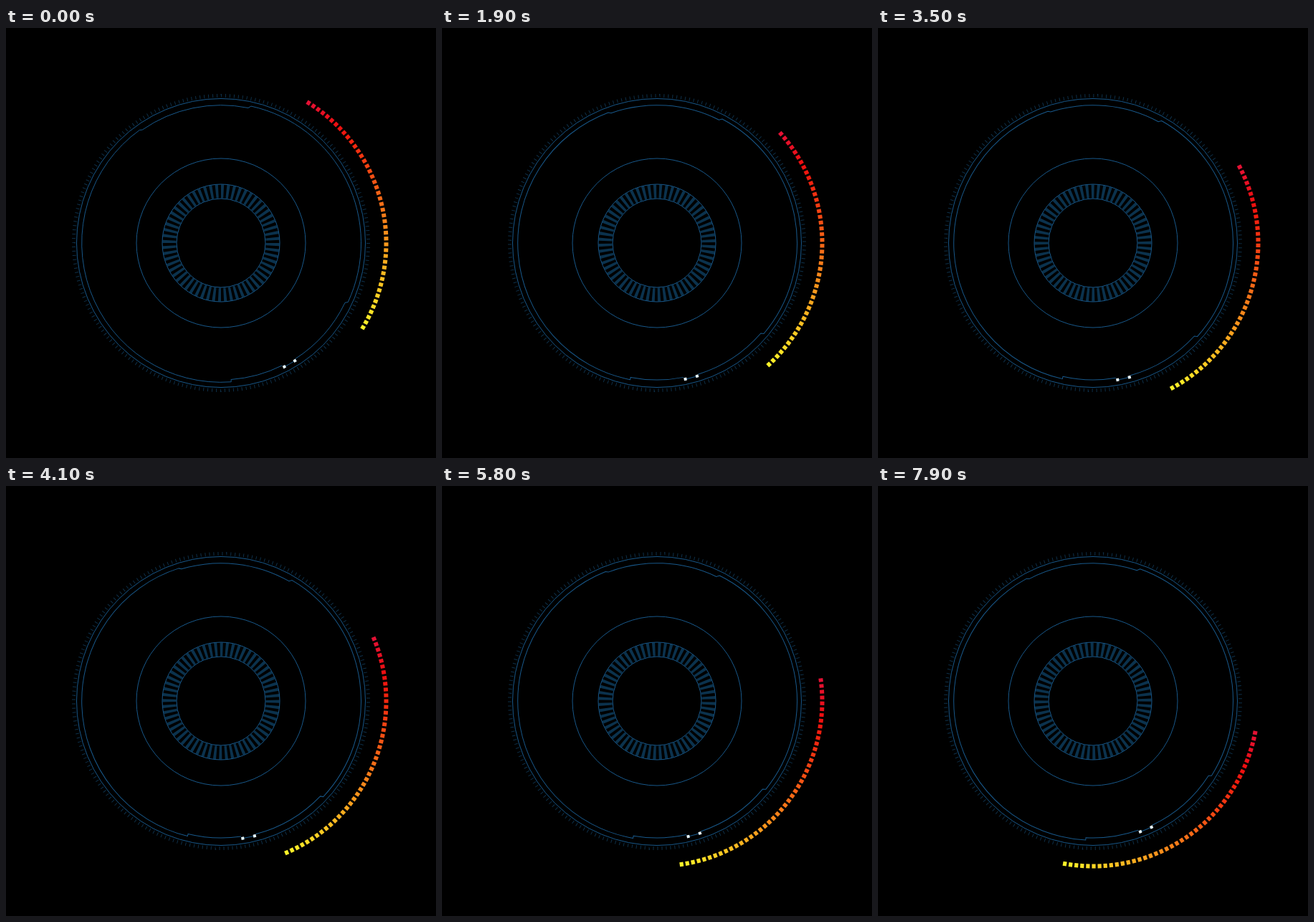
Animation, 600 px wide and 600 px high, one loop 8000 ms. Source, as an HTML page:

```html
<!DOCTYPE html>
<html lang="en">
<head>
<meta charset="utf-8">
<title>Dial</title>
<style>
  html, body { margin: 0; width: 100%; height: 100%; overflow: hidden; background: #000; }
  svg { display: block; width: 100vw; height: 100vh; }
  .line { fill: none; stroke: #18588a; stroke-width: 1; }
  .ticks { fill: none; stroke: #0e3049; stroke-width: 5; stroke-dasharray: 1 5; }
  .spokes { fill: none; stroke: #0b324d; stroke-width: 19; stroke-dasharray: 4 4; }
  .dot { fill: #e6f8ff; }
</style>
</head>
<body>
<svg viewBox="-300 -300 600 600">
  <circle class="ticks" id="ticks" r="205.5" pathLength="1296"/>
  <circle class="line" r="201.5"/>
  <g id="ring"></g>
  <circle class="line" r="118"/>
  <circle class="spokes" id="spokes" r="72" pathLength="480"/>
  <circle class="line" r="82"/>
  <circle class="line" r="62"/>
  <g id="meter"></g>
</svg>
<script>
const LOOP = 8000, STEP = 100;
const COUNT = 45, SPAN = 88.7;
const SWING = 1.55; // seconds per swing of the notched ring
const $ = id => document.getElementById(id);

function add(parent, tag, attrs) {
  const el = document.createElementNS('http://www.w3.org/2000/svg', tag);
  for (const k in attrs) el.setAttribute(k, attrs[k]);
  parent.appendChild(el);
}

function point(r, deg) {
  const a = deg * Math.PI / 180;
  return (r * Math.cos(a)).toFixed(2) + ' ' + (r * Math.sin(a)).toFixed(2);
}

// Joined arcs [radius, from, to]; radius changes become small steps.
function addArcs(...parts) {
  const d = parts.map(([r, a, b], i) =>
    (i ? 'L' : 'M') + point(r, a) + `A${r} ${r} 0 0 1 ` + point(r, b)).join('');
  add($('ring'), 'path', { class: 'line', d });
}

addArcs([191, 63.5, 85.8], [194.3, 85.8, 234.2], [192.3, 235.2, 281.4],
  [195.5, 282.4, 385], [192, 385.7, 417.3]);
addArcs([194, 57.9, 62.9]);
for (const a of [57.9, 62.9])
  add($('ring'), 'rect', { class: 'dot', x: 192, y: -2, width: 4, height: 4, transform: `rotate(${a})` });

for (let i = 0; i < COUNT; i++) {
  const u = i / (COUNT - 1);
  add($('meter'), 'rect', {
    x: 227.5, y: -2.6, width: 6, height: 5.2,
    fill: `hsl(${350 + 67 * u}, ${86 + 14 * u}%, ${48 + 10 * u}%)`,
    transform: `rotate(${(u * SPAN).toFixed(2)})`
  });
}

// Quick rise, slower return.
function swing(s) {
  const a = Math.PI * (s % SWING) / SWING;
  return 21.4 * Math.sin(a) + 1.4 * Math.sin(2 * a);
}

const turn = (id, deg) => $(id).setAttribute('transform', `rotate(${deg.toFixed(3)})`);

function draw(now) {
  const s = Math.floor(now % LOOP / STEP) * STEP / 1000;
  turn('meter', -58 + 8.75 * s);
  turn('ring', swing(s));
  turn('ticks', 0.5 * s);
  turn('spokes', 1.2 * s);
}

let start;
function tick(now) {
  start ??= now;
  draw(now - start);
  requestAnimationFrame(tick);
}
draw(0);
requestAnimationFrame(tick);
</script>
</body>
</html>
```
